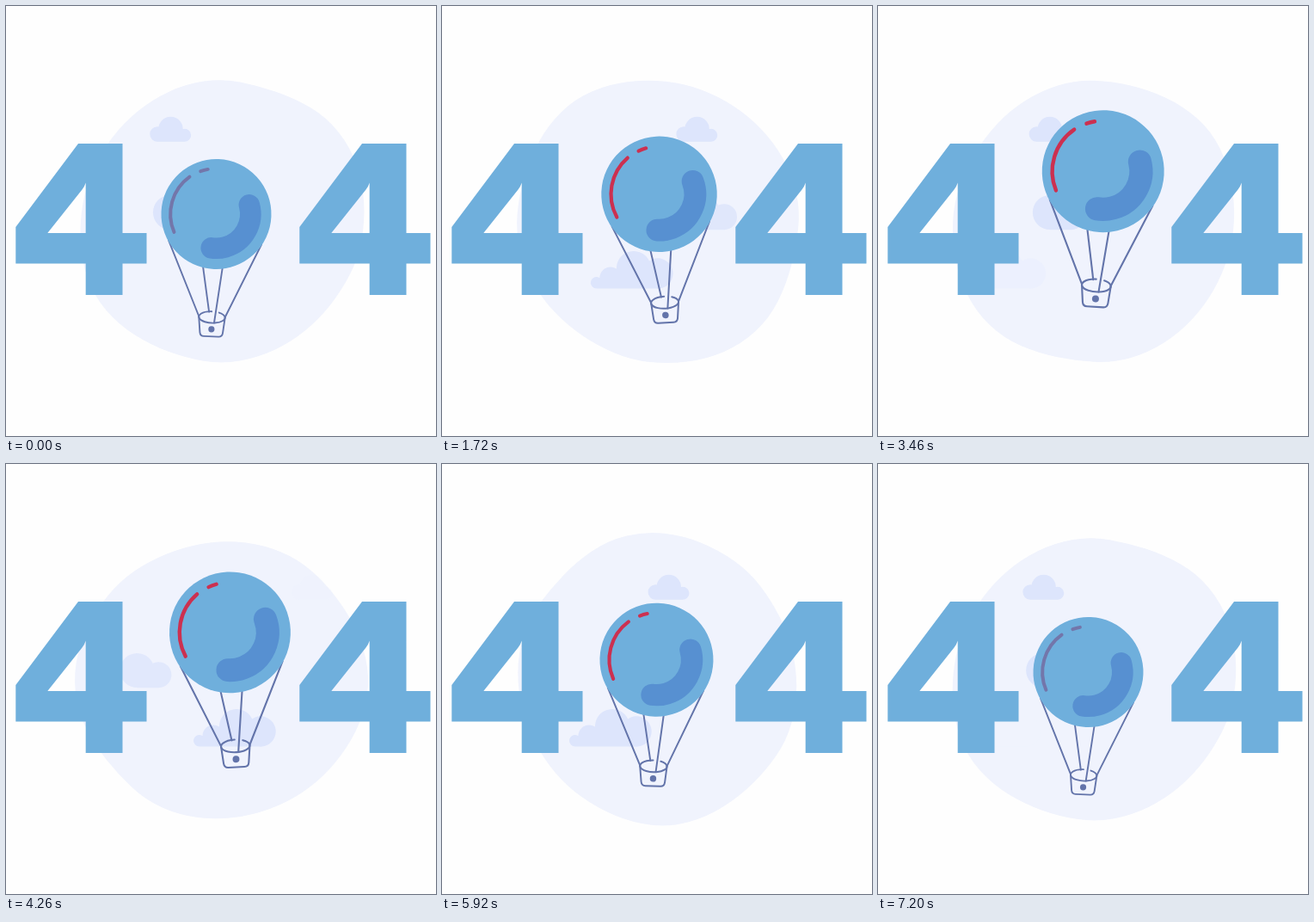
An HTML page with a canvas that plays this animation: 500 px wide and 500 px high, repeating every 7220 ms.

```html
<!DOCTYPE html>
<html lang="en">
<head>
<meta charset="utf-8">
<title>404</title>
<style>
  html, body { margin: 0; width: 100%; height: 100%; overflow: hidden; background: #fefefe; }
  canvas { display: block; width: 500px; height: 500px; }
</style>
</head>
<body>
<canvas id="stage"></canvas>
<script>
const LOOP = 7220, HALF = LOOP / 2, TAU = Math.PI * 2;
const BLUE = '#6fafdc', SHADE = '#5790d1', LINE = '#6374aa';
const RED = '#cc3050', MUTED = '#7376aa', BLOB = '#f0f3fd', CLOUD = '#dde5fc';

const canvas = document.getElementById('stage');
const ctx = canvas.getContext('2d');
const dpr = window.devicePixelRatio || 1;
canvas.width = canvas.height = 500 * dpr;

const rad = deg => deg * Math.PI / 180;

// blob radius every 15 degrees, clockwise from the right
const blobRadii = [
  166, 164, 160.5, 160, 161.5, 163.5, 165.5, 164, 165.5, 169.5, 172, 169,
  165, 163, 161.5, 161.5, 163, 165, 165.8, 163, 166, 171.5, 172.5, 169.5
];

// lobes: x from the left edge, y, radius; bar: left, right, top, base
const clouds = [
  { lobes: [[9, 149, 8.7], [24.5, 143, 14.2], [40.7, 150.2, 7.5]], bar: [9, 40.7, 145, 157.7],
    x: 334.4, speed: 0.0556, start: 600, fade: 500 },
  { lobes: [[20, 240, 20], [45, 245.2, 15]], bar: [20, 45, 240, 260.2],
    x: 316.9, speed: 0.0593, start: 1150, fade: 700 },
  { lobes: [[6.7, 321.8, 6.7], [23, 316, 12.5], [50, 305, 20], [78, 311, 17.7]], bar: [6.7, 78, 316, 328.6],
    x: 245.5, speed: 0.0422, start: 0, fade: 600 }
];

function drawBlob(t) {
  const n = blobRadii.length, turn = t / LOOP * TAU;
  const pt = i => {
    const a = turn + i * TAU / n, r = blobRadii[i % n] + 0.3;
    return [251 + r * Math.cos(a), 250.5 + r * Math.sin(a)];
  };
  const mid = (a, b) => [(a[0] + b[0]) / 2, (a[1] + b[1]) / 2];
  ctx.beginPath();
  ctx.moveTo(...mid(pt(0), pt(1)));
  for (let i = 1; i <= n; i++) ctx.quadraticCurveTo(...pt(i), ...mid(pt(i), pt(i + 1)));
  ctx.fillStyle = BLOB;
  ctx.fill();
}

function drawCloud(c, t) {
  const age = (t - c.start + LOOP) % HALF;
  const [left, right, top, base] = c.bar;
  ctx.save();
  ctx.globalAlpha = Math.max(0, Math.min(1, age / c.fade, (HALF - age) / c.fade));
  ctx.translate(c.x - c.speed * age, 0);
  ctx.beginPath();
  for (const [x, y, r] of c.lobes) {
    ctx.moveTo(x + r, y);
    ctx.arc(x, y, r, 0, TAU);
  }
  ctx.rect(left, top, right - left, base - top);
  ctx.fillStyle = CLOUD;
  ctx.fill();
  ctx.restore();
}

function line(...pts) {
  ctx.beginPath();
  pts.forEach(p => ctx.lineTo(...p));
  ctx.stroke();
}

function arc(r, from, to, width, color) {
  ctx.beginPath();
  ctx.arc(0, 0, r, rad(from), rad(to));
  ctx.lineWidth = width;
  ctx.strokeStyle = color;
  ctx.stroke();
}

function disc(x, y, r, color) {
  ctx.beginPath();
  ctx.arc(x, y, r, 0, TAU);
  ctx.fillStyle = color;
  ctx.fill();
}

function drawBasket() {
  ctx.strokeStyle = LINE;
  ctx.lineWidth = 1.9;
  line([-54, 33], [-15.2, 119.5]);
  line([54, 33], [15.2, 119.5]);
  line([-13.5, 58], [-3.6, 114]);
  line([10.3, 58], [2.8, 126.5]);

  ctx.beginPath();
  ctx.ellipse(0, 120, 15.2, 6.7, 0, rad(-58), rad(268));
  ctx.stroke();

  ctx.beginPath();
  ctx.moveTo(-15.2, 120);
  ctx.lineTo(-13.3, 138);
  ctx.quadraticCurveTo(-12.8, 142.4, -8.5, 142.4);
  ctx.lineTo(8.5, 142.4);
  ctx.quadraticCurveTo(12.8, 142.4, 13.3, 138);
  ctx.lineTo(15.2, 120);
  ctx.stroke();

  disc(0, 134, 3.6, LINE);
}

function drawBalloon(t) {
  const rise = (1 - Math.cos(t / LOOP * TAU)) / 2;
  const sway = 4.8 * Math.cos((t - 3010) / HALF * TAU);
  const scale = (64 + 7 * rise) / 64;
  const glint = Math.min(t, LOOP - t) < 400 ? MUTED : RED;
  ctx.save();
  ctx.translate(244.5 + 17.3 * rise, 242 - 50 * rise);
  ctx.rotate(rad(sway));
  ctx.scale(scale, scale);
  ctx.lineCap = ctx.lineJoin = 'round';
  drawBasket();
  disc(0, 0, 64, BLUE);
  arc(39.8, -18, 96, 24.5, SHADE);
  arc(53.3, 154.5, 232, 4, glint);
  arc(53, 247.5, 257, 4, glint);
  ctx.restore();
}

function drawFour(x) {
  const p = new Path2D(
    'M84 160H135.5V264H163.5V299.5H135.5V336H92.7V299.5H11.3V257Z' +
    'M92.7 205.5Q91.5 209.5 88.5 213.5L48.3 264H92.7Z');
  ctx.save();
  ctx.translate(x, 0);
  ctx.fillStyle = BLUE;
  ctx.fill(p, 'evenodd');
  ctx.restore();
}

function frame(now) {
  const t = now % LOOP;
  ctx.setTransform(dpr, 0, 0, dpr, 0, 0);
  ctx.fillStyle = '#fefefe';
  ctx.fillRect(0, 0, 500, 500);
  drawBlob(t);
  clouds.forEach(c => drawCloud(c, t));
  drawBalloon(t);
  drawFour(0);
  drawFour(330);
}

const begin = performance.now();
function tick() {
  frame(performance.now() - begin);
  requestAnimationFrame(tick);
}
tick();
</script>
</body>
</html>
```
